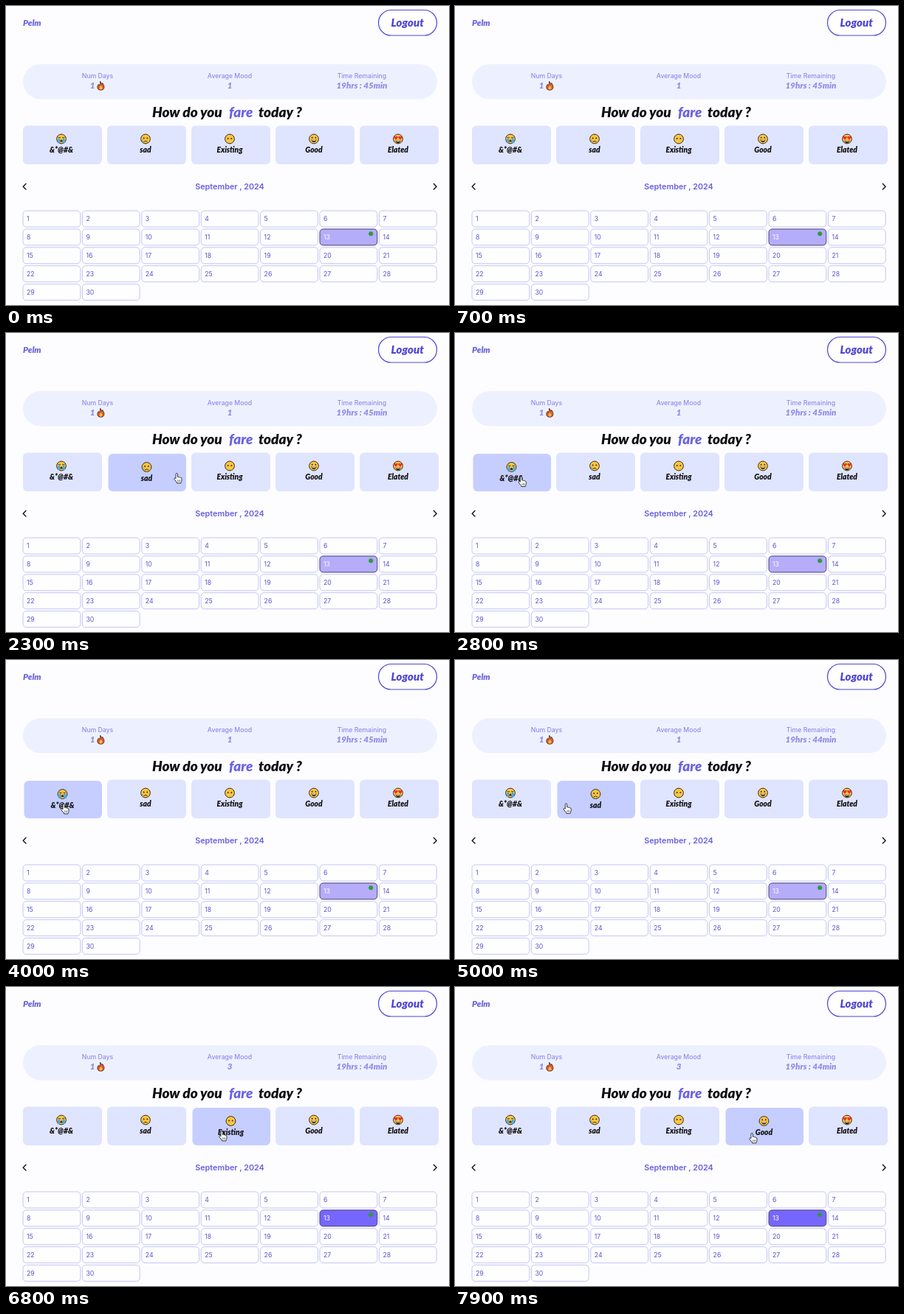
Write an HTML page that moves like this. It is 600x406 px and loops after 8000 ms.

```html
<!DOCTYPE html>
<html lang="en">
<head>
<meta charset="utf-8">
<title>Mood calendar</title>
<style>
html, body { margin: 0; width: 100%; height: 100%; overflow: hidden; background: #fdfdff; }
svg { display: block; width: 100%; height: 100%; }
text { font-family: Inter, sans-serif; }
.fancy { font-family: Lato, "Open Sans", sans-serif; font-weight: 900; font-style: italic; }
.mid { text-anchor: middle; }
.card rect { fill: #dfe4ff; }
.card.hover rect { fill: #c5ceff; }
</style>
</head>
<body>
<svg id="stage" viewBox="0 0 600 406"></svg>
<script>
const text = (x, y, size, fill, str, cls = "", extra = "") =>
  `<text x="${x}" y="${y}" font-size="${size}" fill="${fill}" class="${cls}" ${extra}>${str}</text>`;
const box = (x, y, w, h, r, attrs) =>
  `<rect x="${x}" y="${y}" width="${w}" height="${h}" rx="${r}" ${attrs}/>`;
const dot = (x, y, r, fill) => `<circle cx="${x}" cy="${y}" r="${r}" fill="${fill}"/>`;
const line = (d, color, width) =>
  `<path d="${d}" fill="none" stroke="${color}" stroke-width="${width}" stroke-linecap="round" stroke-linejoin="round"/>`;
const shape = (d, fill, attrs = "") => `<path d="${d}" fill="${fill}" ${attrs}/>`;

const ink = "#3a2d1c";
const eyes = y => dot(-2.3, y, 1, ink) + dot(2.3, y, 1, ink);
const heart = x => shape(`M${x} 1.2 l-2.6 -2.7 q-.5 -2.4 1.4 -2.2 q.9 .1 1.2 1 q.3 -.9 1.2 -1 q1.9 -.2 1.4 2.2z`, "#e8322f");
const grin = y => shape(`M-3.6 ${y} h7.2 q-.5 3.7 -3.6 3.7 t-3.6 -3.7z`, ink) +
  shape(`M-2.8 ${y + .3} h5.6 l-.4 1.1 h-4.8z`, "#fff");
const moods = [
  ["&amp;*@#&amp;", line("M-4 -2 q1.2 1 2.6 .3 M4 -2 q-1.2 1 -2.6 .3", ink, 1) +
    shape("M-4.4 -.8 h2.6 v6.4 h-3.6z M4.4 -.8 h-2.6 v6.4 h3.6z", "#4aa9e4") +
    shape("M-1.7 4 q0 -3 1.7 -3 t1.7 3z", ink)],
  ["sad", eyes(-1) + line("M-2.4 3.8 q2.4 -2.4 4.8 0", ink, 1) +
    shape("M-4.2 .6 q-1.6 2.6 0 3.1 q1.7 -.4 0 -3.1z", "#4aa9e4")],
  ["Existing", eyes(-.6)],
  ["Good", eyes(-1.8) + grin(.8)],
  ["Elated", heart(-3) + heart(3) + grin(1.9)]
];

const card = ([label, face], i) => `<g class="card">${box(23 + 114 * i, 162.5, 107, 52.5, 6, "")}
  <g transform="translate(${75 + 114 * i} 180.5)">
    <circle r="6.4" fill="#fcc540" stroke="${ink}" stroke-width="1"/>${face}
  </g>${text(75 + 114 * i, 199, 10.3, "#111", label, "fancy mid")}</g>`;

const today = 13;
const day = n => {
  const x = 23 + 80.4 * ((n - 1) % 7), y = 278 + 24.9 * Math.floor((n - 1) / 7), on = n === today;
  const look = on ? 'id="cell" stroke="#46406f"' : 'fill="#fefeff" stroke="#c3c4f6"';
  return box(x, y, 77.8, 22, 4.5, look) +
    text(x + 5, y + 14.2, 8.7, on ? "#fff" : "#5c53cc", n) +
    (on ? dot(x + 69.2, y + 6.3, 3, "#2f9a3c") : "");
};

const violet = "#908be9";
const stat = (x, label) => text(x, 97.5, 8.7, violet, label, "mid", 'font-weight="500"');
const value = (x, str, id) => text(x, 112, 11.6, violet, str, "fancy mid", `id="${id}"`);

stage.innerHTML =
  text(23, 27, 11.6, "#6b63dd", "Pelm", "fancy") +
  box(504.5, 5.5, 79, 34.5, 17.2, 'fill="#fff" stroke="#4f46d6" stroke-width="1.2"') +
  text(543.7, 27.6, 15, "#4f46d6", "Logout", "fancy mid") +
  box(23, 79, 561, 47.5, 23.7, 'fill="#edf1ff"') +
  stat(124, "Num Days") + stat(303, "Average Mood") + stat(482, "Time Remaining") +
  value(117, "1", "days") + value(303, "1", "average") + value(482, "", "left") +
  shape("M127.6 102.2 q1.8 2 2.2 4 q.8 -.6 .9 -1.7 q2.4 3 2.3 5.4 q-.2 4.3 -4.6 4.3 q-4.4 0 -4.6 -4 q-.1 -2 1.5 -3.8 q.4 1.2 1 1.5 q1.8 -2.6 1.3 -5.7z",
    "#e8572c", `stroke="${ink}" stroke-width=".8"`) +
  shape("M128.6 108 q2.3 2.4 2 3.8 q-.4 1.7 -2.1 1.7 t-2.1 -1.8 q0 -1.7 2.2 -3.7z", "#fdbd45") +
  text(198, 150.5, 19, "#0d0d12", "How do you", "fancy") +
  text(302, 150.5, 19, "#6c63e4", "fare", "fancy") +
  text(342, 150.5, 19, "#0d0d12", "today ?", "fancy") +
  moods.map(card).join("") +
  line("M27 241.3 l-3.8 3.9 l3.8 3.9 M579.3 241.3 l3.8 3.9 l-3.8 3.9", "#15151c", 1.4) +
  text(303, 249.2, 10.8, "#6860de", "September , 2024", "mid", 'font-weight="600"') +
  Array.from({ length: 30 }, (_, i) => day(i + 1)).join("") +
  `<g id="hand">${shape("M3 7.8 V1.8 q0 -1.3 1.2 -1.3 t1.2 1.3 v3.6 q1.6 -.6 2 .5 q1.5 -.5 1.9 .6 q1.7 -.2 1.7 1.4 v2.2 q0 1.4 -1 2.8 v1 H4.5 v-.9 L.9 8.6 Q.4 7.4 1.4 7 q.9 -.1 1.6 .8z",
    "#fff", 'stroke="#222" stroke-width=".9" stroke-linejoin="round"')}${line("M5.6 9.6 v2.3 M7.2 9.6 v2.3 M8.8 9.6 v2.3", "#444", .6)}</g>`;

// time, x, y of the pointer
const path = [
  [900, 52, 186], [1200, 61, 170], [1300, 61, 170], [2200, 227, 190], [2300, 227, 190],
  [2900, 74, 195], [4500, 74, 195], [5400, 198, 194], [6300, 198, 194],
  [6600, 288, 195], [7600, 288, 195], [7900, 398, 198]
];
const pointer = t => {
  const k = path.findIndex(p => p[0] > t);
  if (k < 0) return path[path.length - 1].slice(1);
  const [a, b] = [path[k - 1], path[k]];
  const u = (t - a[0]) / (b[0] - a[0]), e = u * u * (3 - 2 * u);
  return [1, 2].map(i => a[i] + (b[i] - a[i]) * e);
};

const $ = id => document.getElementById(id);
const cards = document.querySelectorAll(".card");

function draw(t) {
  const shown = t >= path[0][0];
  const [x, y] = shown ? pointer(t) : [-50, -50];
  const level = t < 5500 ? 1 : t < 6800 ? 2 : 3;
  $("hand").setAttribute("transform", `translate(${x} ${y})`);
  $("average").textContent = level;
  $("left").textContent = `19hrs : ${t < 4100 ? 45 : 44}min`;
  $("cell").setAttribute("fill", ["#b5acfa", "#9486fd", "#7766fd"][level - 1]);
  cards.forEach((c, i) => {
    const over = x + 4 - (23 + 114 * i), hover = over >= 0 && over <= 107;
    const rect = c.firstChild;
    c.classList.toggle("hover", hover);
    c.setAttribute("transform", hover ? "translate(1.5 1.5)" : "");
    rect.setAttribute("width", hover ? 105.5 : 107);
    rect.setAttribute("height", hover ? 51 : 52.5);
  });
}

const start = performance.now();
function tick() {
  draw(Math.floor((performance.now() - start) % 8000 / 100) * 100);
  requestAnimationFrame(tick);
}
tick();
</script>
</body>
</html>
```
